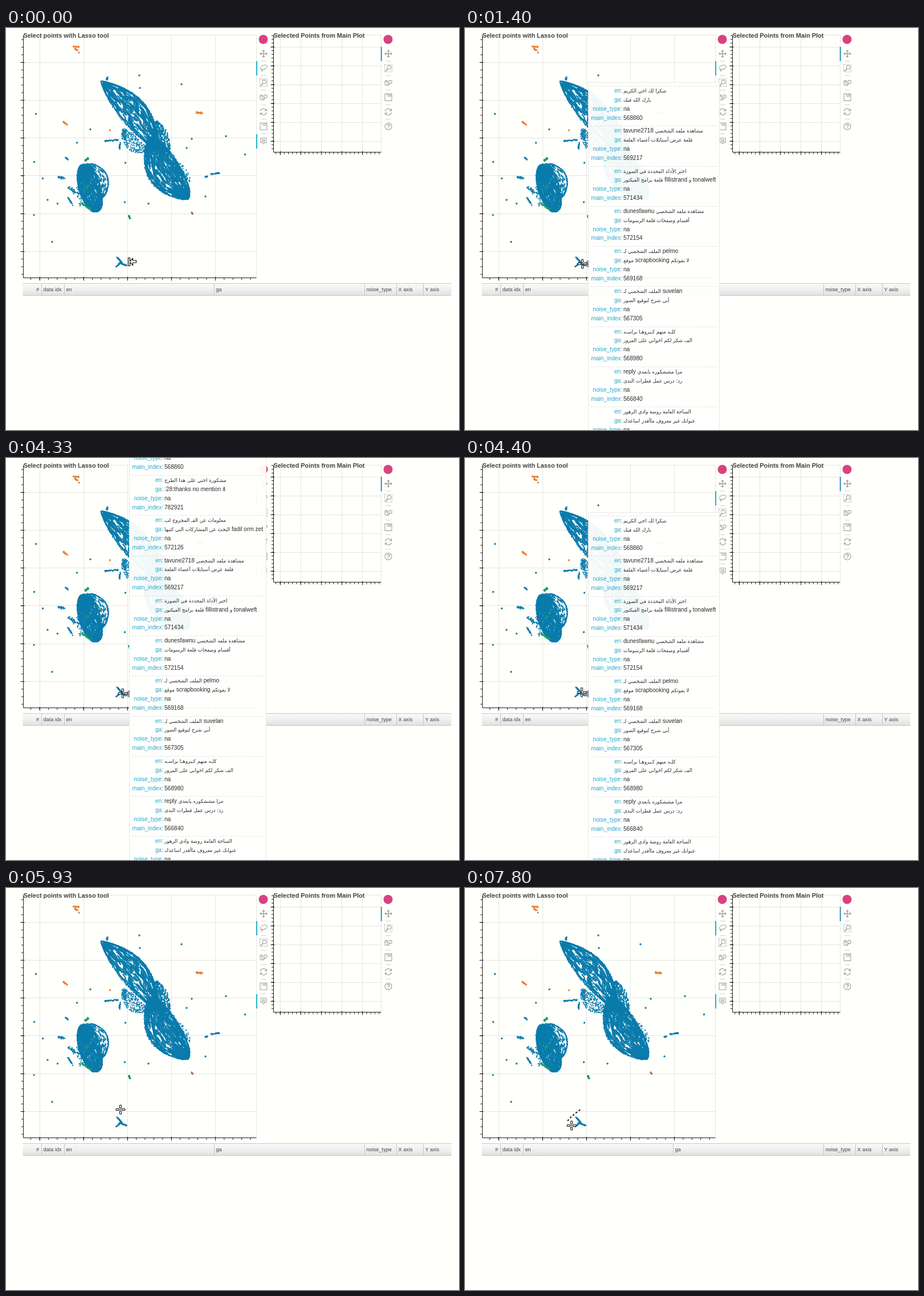
Recreate the animation shown at these times as an HTML page with a canvas. Size 795 by 704 pixels, loop 8000 ms.

```html
<!DOCTYPE html>
<html lang="en">
<head>
<meta charset="utf-8">
<title>Lasso selection</title>
<style>
  html, body { margin: 0; width: 100%; height: 100%; overflow: hidden; background: #fffffc; }
  body { position: relative; font-family: "Liberation Sans", Arial, sans-serif; }
  body > svg, canvas { position: absolute; left: 0; top: 0; width: 795px; height: 704px; }
  text { font-size: 9.2px; fill: #444; }
  text.title { font-size: 10.9px; font-weight: bold; }

  .tip {
    position: absolute; left: 216px; box-sizing: border-box; padding: 5px 4px;
    background: rgba(255, 255, 253, .945); border: 1px solid #e8e8e8;
    font-size: 10.1px; line-height: 15.9px; color: #2b2b2b; white-space: nowrap;
  }
  .tip::before {
    content: ""; position: absolute; left: -10px; top: var(--arrow);
    border: solid transparent; border-width: 7px 10px 7px 0; border-right-color: #909599;
  }
  .entry { height: 69.27px; border-top: 1px dashed #e2e2e2; }
  .entry div { height: 15.9px; }
  .entry b { display: inline-block; width: 55px; margin-right: 2px; text-align: right; font-weight: normal; color: #27a7cd; }
  .entry i { font: 8.7px "DejaVu Sans", sans-serif; line-height: 1; }

  .full, .few, #arrow, #cross, #lasso { animation: 8s step-end infinite; }
  .full { animation-name: full; }
  .few { animation-name: few; }
  #arrow { animation-name: arrow; }
  #cross { animation-name: cross; }
  #lasso { animation-name: lasso; }
  @keyframes full { 0%, 55% { visibility: hidden } 20.875% { visibility: visible } 100% { visibility: hidden } }
  @keyframes few {
    0%, 20.875%, 56.625%, 100% { visibility: hidden }
    15.875%, 55% { visibility: visible }
  }
  @keyframes arrow { 0% { visibility: visible } 4.125%, 100% { visibility: hidden } }
  @keyframes lasso { 0% { visibility: hidden } 92.5%, 100% { visibility: visible } }
  @keyframes cross {
    0%      { transform: translate(-40px, -40px) }
    4.125%  { transform: translate(217px, 411px) }
    10.875% { transform: translate(211px, 410px) }
    13.375% { transform: translate(208px, 412px) }
    15%     { transform: translate(206px, 413px) }
    54.125% { transform: translate(205px, 412px); animation-timing-function: steps(4) }
    57.5%   { transform: translate(205px, 405px); animation-timing-function: steps(2) }
    60%     { transform: translate(203px, 391px) }
    63.375% { transform: translate(202px, 388px) }
    74.125% { transform: translate(201px, 388px) }
    75.875% { transform: translate(192px, 396px) }
    76.625% { transform: translate(184px, 403px); animation-timing-function: steps(2) }
    80%     { transform: translate(179px, 408px) }
    92.5%   { transform: translate(180px, 411px) }
    93.375% { transform: translate(184px, 413px); animation-timing-function: steps(2) }
    97.5%, 100% { transform: translate(187px, 416px) }
  }
</style>
</head>
<body>
<svg viewBox="0 0 795 704">
  <defs>
    <linearGradient id="head" x2="0" y2="1">
      <stop stop-color="#fafafa"/><stop offset=".5" stop-color="#f0f0f0"/><stop offset="1" stop-color="#e0e0e0"/>
    </linearGradient>
  </defs>
  <g id="plots"></g>
  <g id="bars" fill="none" stroke="#a3a3a3" stroke-width="1.1"></g>
  <path d="M440 58V83M440 186V211" stroke="#25b2cc" stroke-width="2"/>
  <path d="M658.7 33V58" stroke="#2f8fb6" stroke-width="2"/>
  <rect x="29.5" y="447" width="752" height="21.5" fill="url(#head)"/>
  <path d="M29.5 447.5H781.5M29.5 468.5H781.5" stroke="#c8c8c8"/>
  <g id="labels" stroke="none"></g>
</svg>

<canvas id="points" width="795" height="704"></canvas>
<div id="tips"></div>

<svg viewBox="0 0 795 704">
  <path id="lasso" d="M202 388.3L192 396L184 403L180 408" fill="none" stroke="#111" stroke-width="2" stroke-dasharray="3.28"/>
  <path id="arrow" d="M214.5 402.5H217.5V408.5L222.5 403.5V407H228.5V411H222.5V415.5L217.5 410V416.5H214.5Z" fill="#fff" stroke="#111" stroke-width="1.2"/>
  <g id="cross" fill="#fff" stroke="#111" stroke-width="1.1">
    <rect x="-8" y="-1.5" width="5.5" height="3" rx="1"/>
    <rect x="2.5" y="-1.5" width="5.5" height="3" rx="1"/>
    <rect x="-1.5" y="-8" width="3" height="5.5" rx="1"/>
    <rect x="-1.5" y="2.5" width="3" height="5.5" rx="1"/>
    <rect x="-.6" y="-.6" width="1.2" height="1.2" stroke-width=".7"/>
  </g>
</svg>

<script>
const $ = id => document.getElementById(id);

// Axes and grids
function steps(first, gap, end, start) {
  const out = [];
  for (let v = first; v <= end; v += gap) if (v >= start) out.push(v);
  return out;
}

function plot(l, t, r, b, gx, dx, gy, dy) {
  const crisp = v => Math.floor(v) + .5;
  const xs = steps(gx, dx, r, l), ys = steps(gy, dy, b, t);
  const grid = xs.map(x => `M${crisp(x)} ${t}V${b}`).join('') + ys.map(y => `M${l} ${crisp(y)}H${r}`).join('');
  const minor = steps(gx - dx, dx / 5, r, l).map(x => `M${x} ${b}v3.5`).join('') +
                steps(gy - dy, dy / 5, b, t).map(y => `M${l} ${y}h-3.5`).join('');
  const major = xs.map(x => `M${crisp(x)} ${b - 2}v7`).join('') + ys.map(y => `M${l + 2} ${crisp(y)}h-7`).join('');
  return `<path d="${grid}M${l} ${t}H${r}V${b}" fill="none" stroke="#e4e5e3"/>
    <path d="${minor}${major}M${l} ${t}V${b}H${r}" fill="none" stroke="#1c1c1c"/>`;
}
$('plots').innerHTML = plot(30.5, 12.5, 439.5, 437.5, 59, 77.1, 60.2, 66.25) +
                       plot(469.5, 12.5, 658.5, 217.5, 481, 36.2, 33, 33);

// Toolbars
const icons = {
  move: '<path d="M-6 0H6M0-6V6M-4-2L-6 0L-4 2M4-2L6 0L4 2M-2-4L0-6L2-4M-2 4L0 6L2 4" stroke-width="1.4"/>',
  lasso: '<ellipse cx="1" cy="-1.5" rx="6" ry="3.6" transform="rotate(-18)"/><path d="M-4 1Q-6 3-3 3T-4 6"/>',
  box: '<path d="M-6.5-6.5H6.5V6.5H-6.5Z" stroke-dasharray="1.5 1.5"/><circle cx="1.5" cy="-1.5" r="3.3"/><path d="M-1 1L-5 5.5" stroke-width="1.8"/>',
  wheel: '<rect x="-6" y="-4" width="4.5" height="8.5" rx="2.2"/><path d="M-3.7-4V0"/><circle cx="3.5" cy="-1.5" r="2.8"/><path d="M2 1L-.5 5.5" stroke-width="1.5"/>',
  reset: '<path d="M-5.5-1A5.5 5.5 0 0 1 4.5-3M5.5 1A5.5 5.5 0 0 1-4.5 3M5.5-5.5V-2H2M-5.5 5.5V2H-2" stroke-width="1.3"/>',
  save: '<path d="M-6-6H6V6H-6ZM-1-6V-2H4V-6M2-5V-3"/>',
  hover: '<path d="M-5-5H5V3H2L0 5.5L-2 3H-5ZM-3-2.5H3M-3-.5H3M-3 1.3H3"/>',
  help: '<circle r="6"/><path d="M-2-1.5Q-2-3.5 0-3.5T2-1.5Q2-.5 0 .7V1.5M0 2.7V4" stroke-width="1.4"/>'
};
function toolbar(x, names) {
  const parts = names.map((n, i) => {
    const rule = i ? '<path d="M-4.5-12.5H4.5" stroke="#d2d2d2"/>' : '';
    return `<g transform="translate(${x} ${45 + i * 25.45})">${rule}${icons[n]}</g>`;
  });
  return `<circle cx="${x - .5}" cy="20" r="8" fill="#d8437f" stroke="none"/>` + parts.join('');
}
$('bars').innerHTML = toolbar(452, ['move', 'lasso', 'box', 'wheel', 'reset', 'save', 'hover']) +
                      toolbar(671, ['move', 'box', 'wheel', 'save', 'reset', 'help']);

// Titles and table header
const label = (x, y, s, cls = '') => `<text x="${x}" y="${y}" class="${cls}">${s}</text>`;
const columns = { 'data idx': 62.5, en: 102.5, ga: 365.5, noise_type: 629.5, 'X axis': 685.5, 'Y axis': 732.5 };
$('labels').innerHTML =
  label(30.5, 17, 'Select points with Lasso tool', 'title') +
  label(469.5, 17, 'Selected Points from Main Plot', 'title') +
  label(53, 461, '#') +
  Object.entries(columns).map(([s, x]) => `<path d="M${x} 447V468" stroke="#c4c4c4"/>` + label(x + 3, 461, s)).join('');

// Hover tooltips
const rows = [
  ['شكرا لك اخي الكريم', 'بارك الله فيك', 568860],
  ['مشكورة اختي على هذا الطرح', ':28:thanks no mention it', 782921],
  ['معلومات عن القـ المجروح لب', 'البحث عن المشاركات التي كتبها fadil orm zet', 572126],
  ['tavune2718 مشاهدة ملفه الشخصي', 'قلعة عرض أستايلات أعضاء القلعة', 569217],
  ['اختر الأداة المحددة في الصورة', 'قلعة برامج الفيكتور fillistrand و tonalweft', 571434],
  ['dunesfawnu مشاهدة ملفه الشخصي', 'أقسام وصفحات قلعة الرسومات', 572154],
  ['الملف الشخصي لـ pelmo', 'موقع scrapbooking لا يفوتكم', 569168],
  ['الملف الشخصي لـ suvelan', 'أبي شرح لتوقيع الصور', 567305],
  ['كلـه منهم كـبروهـا براسـه', 'الف شكر لكم اخواني على المرور', 568980],
  ['reply مرا مششكوره يابعدي', 'رد: درس عمل قطرات الندى', 566840],
  ['الساحة العامة روضة وادي الزهور', 'عنوانك غير معروف ماأقدر اساعدك', 568317]
];
function tip(cls, top, width, list) {
  const arabic = s => String(s).replace(/[\u0600-\u06ff][\u0600-\u06ff: ]*/g, '<i>$&</i>');
  const line = (k, v) => `<div><b>${k}:</b>${arabic(v)}</div>`;
  const body = list.map(([en, ga, id]) => '<div class="entry">' +
    line('en', en) + line('ga', ga) + line('noise_type', 'na') + line('main_index', id) + '</div>').join('');
  return `<div class="tip ${cls}" style="top:${top}px;width:${width}px;--arrow:${405 - top}px">${body}</div>`;
}
$('tips').innerHTML = tip('few', 95, 231, [rows[0], ...rows.slice(3)]) + tip('full', -46.3, 241, rows);

// Scatter points
const BLUE = '#0b7cac', GREEN = '#159f5b', ORANGE = '#ee7f33', BROWN = '#a8765c';
const c = $('points').getContext('2d');
let seed = 11;
const rnd = () => (seed = (seed * 16807) % 2147483647) / 2147483647;
const jitter = s => (rnd() + rnd() - 1) * s;

function dot(x, y, r = 1.7, color = BLUE) {
  c.fillStyle = color;
  c.beginPath();
  c.arc(x, y, r, 0, 7);
  c.fill();
}

// A leaf of short dotted runs along a bowed axis; bias above 1 crowds its right side
function leaf(x1, y1, x2, y2, { bend = 0, width, blunt = .8, runs, grain = 10, bias = 1, rim = true }) {
  const dx = x2 - x1, dy = y2 - y1, len = Math.hypot(dx, dy);
  const put = (t, u) => {
    const arch = Math.sin(Math.PI * t);
    const off = (bend * arch + width * arch ** blunt * u) / len;
    dot(x1 + dx * t + dy * off + jitter(.8), y1 + dy * t - dx * off + jitter(.8), 1.05);
  };
  for (let i = 0; i < runs; i++) {
    const t = rnd(), u = 1 - 2 * rnd() ** bias;
    for (let k = 0; k < grain; k++) put(Math.min(1, t + k / len), u);
  }
  if (rim) for (let k = 0; k < len; k += .7) for (const side of [-1, 1]) put(k / len, side + jitter(.07));
}

function clump(x1, y1, x2, y2, color = BLUE, s = 1.2) {
  const n = 6 + Math.hypot(x2 - x1, y2 - y1) * 1.3;
  for (let i = 0; i < n; i++) {
    const k = rnd();
    dot(x1 + (x2 - x1) * k + jitter(s), y1 + (y2 - y1) * k + jitter(s), 1.2, color);
  }
}

// Long cloud in two leaves, with loose edges
leaf(167, 93, 268, 214, { bend: 9, width: 23, runs: 480, bias: 1.3 });
leaf(252, 192, 319, 299, { bend: -10, width: 28, blunt: .6, runs: 720, bias: 1.35 });
leaf(264, 163, 281, 232, { bend: 4, width: 11, blunt: .6, runs: 330, grain: 2, rim: false });
leaf(205, 178, 246, 216, { bend: -6, width: 13, blunt: .5, runs: 270, grain: 1, rim: false });
leaf(306, 238, 322, 270, { width: 6, runs: 40, grain: 1, rim: false });

// Round cloud
leaf(136, 238, 160, 321, { bend: -2, width: 18, blunt: .35, runs: 430, bias: .95 });
leaf(146, 238, 170, 296, { bend: 8, width: 13, blunt: .5, runs: 95, grain: 4 });
leaf(128, 250, 130, 312, { width: 5, runs: 60, grain: 1, rim: false });

// Outlying groups
[[194, 400, 204, 412], [194, 418, 202, 410], [199, 411, 212, 416], [174, 198, 197, 196], [360, 256, 374, 254],
 [349, 261, 355, 259], [109, 297, 117, 310], [200, 200, 199, 212], [105, 227, 109, 230], [178, 86, 177, 91],
 [216, 329, 217, 331]].forEach(p => clump(...p));
clump(92, 261, 102, 263, BLUE, 2.5);
clump(110, 280, 126, 289, BLUE, 4);
clump(207, 180, 209, 196, BLUE, 3);
clump(139, 232, 144, 228, GREEN, 2);
clump(141, 278, 145, 278, GREEN, 2);
clump(132, 306, 150, 319, GREEN, 2);
clump(217, 332, 218, 334, GREEN);
clump(118, 33, 128, 33, ORANGE);
clump(121, 35, 126, 40, ORANGE, 2);
clump(333, 148, 346, 149, ORANGE, 1.8);
clump(100, 164, 108, 170, ORANGE);
clump(326, 323, 327, 326, BROWN);

[[234, 83], [235, 105], [308, 98.5], [52.5, 150.5], [148, 177.5], [124.5, 201], [386, 189.5], [419.5, 221.5],
 [326, 194], [317, 210], [209.5, 236], [49.5, 234.5], [64.5, 263.5], [73, 301], [90.5, 307.5], [208.5, 305],
 [250, 307.5], [350, 295], [81, 374.5]].forEach(p => dot(...p));
dot(49, 327.5, 1.7, GREEN);
dot(182.5, 179, 1.7, ORANGE);
dot(128, 43, 1.5, BROWN);
</script>
</body>
</html>
```
